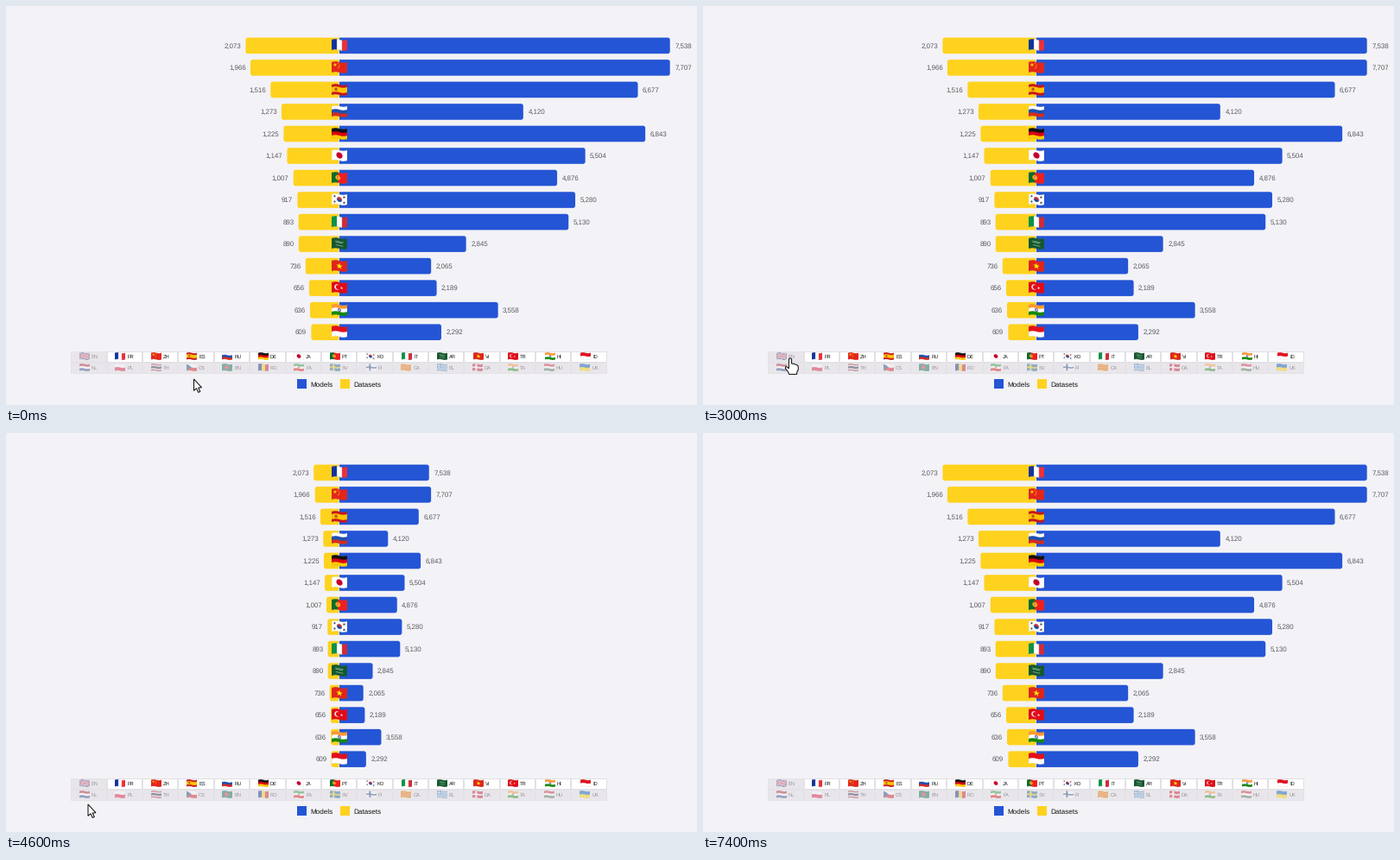
Animation of 800x462 px, one loop 7500 ms. Source, as a matplotlib script:

```python
import numpy as np
import matplotlib.pyplot as plt
from matplotlib.animation import FuncAnimation
from matplotlib.colors import to_rgb
from matplotlib.patches import PathPatch, Polygon, Rectangle
from matplotlib.path import Path
from matplotlib.transforms import Affine2D

W, H, DPI = 800, 462, 100
FRAMES, STEP = 75, 100

BG, BLUE, YELLOW = "#f3f2f6", "#2455d5", "#ffd21e"
ZERO, TOP, PITCH, BAR_H = 385, 45.9, 25.52, 18.6
WIDE, NARROW = 0.0519, 0.00343      # pixels per item without / with EN
ANIM = 650
CS_ON, CS_OFF = 450, 2250
EN_ON, EN_OFF = 3050, 4400

ROWS = [
    ("EN", 18890, 120272), ("FR", 2073, 7538), ("ZH", 1966, 7707),
    ("ES", 1516, 6677), ("RU", 1273, 4120), ("DE", 1225, 6843),
    ("JA", 1147, 5504), ("PT", 1007, 4876), ("KO", 917, 5280),
    ("IT", 893, 5130), ("AR", 890, 2845), ("VI", 736, 2065),
    ("TR", 656, 2189), ("HI", 636, 3558), ("ID", 609, 2292),
    ("CS", 470, 1411),
]
CODES = [r[0] for r in ROWS[:15]] + "NL PL TH CS BN RO FA SV FI CA EL DA TA HU UK".split()

# ---- flags: stripe direction, stripe colours, then shapes on top
INDIA = ("h", "#ff9933 #fff #138808", ("disc", .5, .5, .15, "#2a3c8f"),
         ("disc", .5, .5, .09, "#c8cce6"))


def nordic(base, cross):
    return ("h", base, ("box", .28, 0, .44, 1, cross), ("box", 0, .4, 1, .6, cross))


FLAGS = {
    "EN": ("h", "#1f2f7c", ("diag", .1, "#fff"), ("diag", .04, "#d2203a"),
           ("box", .41, 0, .59, 1, "#fff"), ("box", 0, .36, 1, .64, "#fff"),
           ("box", .45, 0, .55, 1, "#d2203a"), ("box", 0, .42, 1, .58, "#d2203a")),
    "FR": ("v", "#12339c #fff #ee2f3a"),
    "ZH": ("h", "#e4251b", ("star", .22, .32, .2, "#ffdc00"),
           ("disc", .42, .15, .045, "#ffdc00"), ("disc", .49, .3, .045, "#ffdc00"),
           ("disc", .49, .46, .045, "#ffdc00"), ("disc", .42, .6, .045, "#ffdc00")),
    "ES": ("h", "#c8141e #ffc400 #ffc400 #c8141e", ("box", .2, .36, .36, .64, "#b5542a")),
    "RU": ("h", "#fff #1d4fb0 #d62b1f"),
    "DE": ("h", "#111 #d8000f #ffcc00"),
    "JA": ("h", "#fff", ("disc", .5, .5, .29, "#c5002f")),
    "PT": ("v", "#0b6b2e #0b6b2e #f01f1f #f01f1f #f01f1f", ("disc", .4, .5, .22, "#ffe000"),
           ("box", .33, .36, .47, .62, "#e8212b"), ("box", .37, .42, .43, .56, "#fff")),
    "KO": ("h", "#fff", ("disc", .5, .5, .24, "#cd2e3a"), ("half", .5, .5, .24, "#0f4aa0"),
           ("box", .14, .16, .25, .32, "#444"), ("box", .75, .16, .86, .32, "#444"),
           ("box", .14, .68, .25, .84, "#444"), ("box", .75, .68, .86, .84, "#444")),
    "IT": ("v", "#0a9247 #fff #d22b37"),
    "AR": ("h", "#14582f", ("box", .22, .3, .78, .34, "#b8d2c0"),
           ("box", .26, .4, .72, .45, "#b8d2c0"), ("box", .27, .68, .74, .72, "#dfeae2")),
    "VI": ("h", "#e0251b", ("star", .5, .52, .32, "#ffee00")),
    "TR": ("h", "#e30a17", ("disc", .36, .5, .26, "#fff"),
           ("disc", .41, .5, .21, "#e30a17"), ("star", .64, .5, .14, "#fff")),
    "HI": INDIA,
    "ID": ("h", "#e2101c #fff"),
    "NL": ("h", "#b01f2e #fff #23468c"),
    "PL": ("h", "#fff #dc143c"),
    "TH": ("h", "#a51931 #fff #2d2a4a #2d2a4a #fff #a51931"),
    "CS": ("h", "#fff #d7141a", ("tri", .5, "#11457e")),
    "BN": ("h", "#006a4e", ("disc", .46, .5, .28, "#f42a41")),
    "RO": ("v", "#002b7f #fcd116 #ce1126"),
    "FA": ("h", "#239f40 #fff #da0000", ("disc", .5, .5, .12, "#da0000")),
    "SV": nordic("#1565a8", "#ffcd00"),
    "FI": nordic("#fff", "#1d3f86"),
    "CA": ("h", " ".join(["#fcdd09 #da121a"] * 4) + " #fcdd09"),
    "EL": ("h", " ".join(["#0d5eaf #fff"] * 4) + " #0d5eaf", ("box", 0, 0, .38, .55, "#0d5eaf"),
           ("box", .15, 0, .22, .55, "#fff"), ("box", 0, .22, .38, .33, "#fff")),
    "DA": nordic("#c8102e", "#fff"),
    "TA": INDIA,
    "HU": ("h", "#ce2939 #fff #477050"),
    "UK": ("h", "#0057b7 #ffd700"),
}
FW, FH, CLOTH, WAVE = 17.2, 13.2, 11.4, .7     # flag box, cloth height, wave height


def shape_mask(kind, args, u, v):
    if kind == "box":
        x0, y0, x1, y1 = args
        return (u >= x0) & (u < x1) & (v >= y0) & (v < y1)
    if kind == "diag":
        return np.minimum(abs(u - v), abs(u + v - 1)) < args[0]
    if kind == "tri":
        return u < args[0] * (1 - abs(2 * v - 1))
    x, y, r = args
    dx, dy = (u - x) * 1.45, v - y
    dist = np.hypot(dx, dy)
    if kind == "disc":
        return dist < r
    if kind == "half":
        return (dist < r) & (dy > .25 * dx)
    fifth = 2 * np.pi / 5
    a = np.mod(np.arctan2(dx, -dy), fifth)
    a = np.minimum(a, fifth - a)
    return dist < r * np.cos(fifth) / np.cos(fifth - a)


def flag_image(code, zoom=5):
    nx, ny = int(FW * zoom), int(FH * zoom)
    u, y = np.meshgrid((np.arange(nx) + .5) / nx, (np.arange(ny) + .5) / ny)
    v = ((y - .5) * FH + WAVE * np.sin(2 * np.pi * u)) / CLOTH + .5
    way, cols, *shapes = FLAGS[code]
    cols = np.array([to_rgb(c) for c in cols.split()])
    n = len(cols)
    img = np.ones((ny, nx, 4))
    img[..., :3] = cols[np.clip(((v if way == "h" else u) * n).astype(int), 0, n - 1)]
    for kind, *args, col in shapes:
        img[shape_mask(kind, args, u, v), :3] = to_rgb(col)
    rim = np.minimum(np.minimum(u, 1 - u) * 1.45, np.minimum(v, 1 - v)) < .05
    img[rim, :3] = img[rim, :3] * .85 + .06
    img[..., 3] = (v >= 0) & (v <= 1)
    return img


# ---- stage
plt.rcParams.update({"font.family": "Liberation Sans", "text.hinting": "none"})
fig = plt.figure(figsize=(W / DPI, H / DPI), dpi=DPI, facecolor=BG)
ax = fig.add_axes([0, 0, 1, 1])
ax.set_xlim(0, W)
ax.set_ylim(H, 0)
ax.axis("off")


def label(x, y, s, px, color, **kw):
    return ax.text(x, y, s, fontsize=px * 72 / DPI, color=color, va="baseline", **kw)


def put_flag(code, x, y, width, **kw):
    h = width * FH / FW
    return ax.imshow(flag_image(code), extent=(x, x + width, y + h / 2, y - h / 2),
                     aspect="auto", **kw)


def ease(x):
    return .5 - .5 * np.cos(np.pi * np.clip(x, 0, 1))


def bar_path(x0, x1, y):
    """Bar from x0 to x1 with its far corners rounded."""
    d = np.sign(x1 - x0) * min(2.6, abs(x1 - x0))
    r, t, b = abs(d), y - BAR_H / 2, y + BAR_H / 2
    pts = [(x0, t), (x1 - d, t), (x1, t), (x1, t + r),
           (x1, b - r), (x1, b), (x1 - d, b), (x0, b), (x0, t)]
    M, L, Q = Path.MOVETO, Path.LINETO, Path.CURVE3
    return Path(pts, [M, L, Q, Q, L, Q, Q, L, L])


def text_width(s):
    return sum(2.2 if c == "," else 4.4 for c in s)


class Row:
    X = 376.8

    def __init__(self, code, sets, models):
        self.code, self.sets, self.models = code, sets, models
        self.left, self.right = (
            ax.add_patch(PathPatch(bar_path(0, 1, 0), fc=c, lw=0)) for c in (YELLOW, BLUE))
        self.num_l = label(0, 0, f"{sets:,}", 7.9, "#5a5a5e", ha="right")
        self.num_r = label(0, 0, f"{models:,}", 7.9, "#5a5a5e")
        self.flag = put_flag(code, self.X, 0, FW, zorder=4)
        self.parts = (self.left, self.right, self.num_l, self.num_r, self.flag)

    def show(self, on):
        for p in self.parts:
            p.set_visible(on)

    def place(self, y, scale, grow):
        limit = 794 - 5.5 - text_width(self.num_r.get_text())
        x0 = ZERO - self.sets * scale * grow
        x1 = min(ZERO + self.models * scale * grow, limit)
        self.left.set_path(bar_path(385.4, min(x0, 385), y))
        self.right.set_path(bar_path(386, max(x1, 386.4), y))
        self.num_l.set_position((x0 - 5.2, y + 2.6))
        self.num_r.set_position((x1 + 5.5, y + 2.6))
        self.flag.set_extent((self.X, self.X + FW, y + FH / 2, y - FH / 2))


class Cell:
    CW = 41.36

    def __init__(self, i, code, shift):
        x, y = 75 + i % 15 * self.CW, 399.6 + i // 15 * 13
        self.box = ax.add_patch(Rectangle((x + .4, y + .3), self.CW - 1, 11.8, lw=.6,
                                          transform=shift))
        wide = 7 - 2 * code.count("I")
        x += (self.CW - 14.3 - wide) / 2
        self.flag = put_flag(code, x, y + 6.2, 11.6, transform=shift, zorder=3)
        self.text = label(x + 14, y + 8.1, code, 5.8, "k", transform=shift)

    def set_on(self, on):
        self.box.set(fc="#ffffff" if on else "#e8e6ea", ec="#dddce1" if on else "#e3e1e6")
        self.flag.set_alpha(1 if on else .45)
        self.text.set_color("#1c1c1e" if on else "#9b999f")


rows = [Row(*r) for r in ROWS]
offset = Affine2D()
shift = offset + ax.transData
cells = {c: Cell(i, c, shift) for i, c in enumerate(CODES)}
for x, color, name in ((337.2, BLUE, "Models"), (387.2, YELLOW, "Datasets")):
    ax.add_patch(Rectangle((x, 432), 11, 11, fc=color, lw=0, transform=shift))
    label(x + 15, 440.5, name, 8.1, "#111111", transform=shift)

# ---- pointer
ARROW = np.array([(0, 0), (0, 13.4), (3, 10.7), (5.2, 15.4), (7.3, 14.5), (5.2, 10), (9, 9.7)])
HAND = np.array([(-1.6, 1), (-.7, 0), (.7, 0), (1.6, 1), (1.6, 6), (4.2, 6.3), (6.6, 7.2),
                 (8.8, 8.4), (9.3, 10), (9.3, 13), (7.8, 16), (7.6, 18.4), (-1.2, 18.4),
                 (-2.4, 15.8), (-5.6, 11.4), (-5.4, 9.8), (-4, 9.6), (-1.6, 11.8)])
pointer = ax.add_patch(Polygon(ARROW, fc="white", ec="#111111", lw=.75, zorder=9))

STOPS = [(0, 217.5, 432), (400, 217.5, 420), (900, 217.5, 420), (1200, 218, 428),
         (1500, 218, 440), (2300, 218, 440), (2900, 101, 408), (3300, 101, 408),
         (3700, 100, 412), (4100, 97, 430), (4600, 95, 430), (5000, 95, 432),
         (5500, 95, 466)]


def pointer_at(t):
    for (t0, *a), (t1, *b) in zip(STOPS, STOPS[1:]):
        if t <= t1:
            return np.array(a) + (np.array(b) - a) * ease((t - t0) / (t1 - t0))
    return None


def update(k):
    t = k * STEP
    en, cs = EN_ON <= t < EN_OFF, CS_ON <= t < CS_OFF
    shrink = ease((t - EN_ON) / ANIM) - ease((t - EN_OFF) / ANIM)
    scale = WIDE + (NARROW - WIDE) * shrink
    grow = {"EN": ease((t - EN_ON) / ANIM), "CS": ease((t - CS_ON) / ANIM)}
    on = {"EN": en, "CS": cs}

    y = TOP
    for row in rows:
        shown = on.get(row.code, True)
        row.show(shown)
        if shown:
            row.place(y, scale, grow.get(row.code, 1))
            y += PITCH
    for i, code in enumerate(CODES):
        cells[code].set_on(on.get(code, i < 15))

    drop = PITCH if en or cs else 0
    offset.clear().translate(0, drop)

    pos = pointer_at(t)
    pointer.set_visible(pos is not None)
    if pos is not None:
        over = 400 <= pos[1] - drop <= 425.5
        pointer.set_xy((HAND if over else ARROW) + pos)
    return []


anim = FuncAnimation(fig, update, frames=FRAMES, interval=STEP, repeat=True)
plt.show()
```
